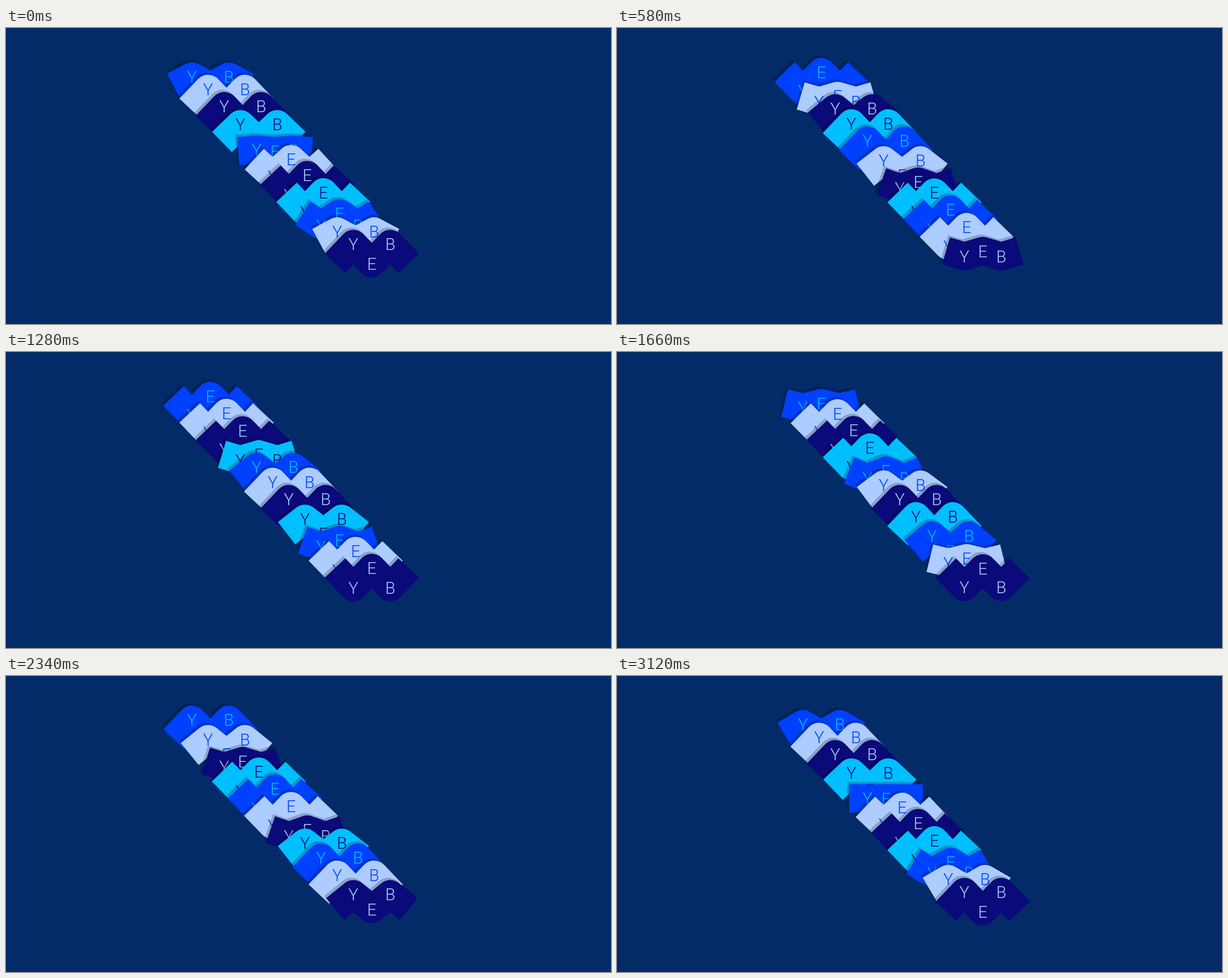
An HTML page with a canvas for the animation above (3140 ms loop, 1068 by 524 pixels).

```html
<!DOCTYPE html>
<html lang="en">
<head>
<meta charset="utf-8">
<title>Waving ribbons</title>
<style>
  html, body { margin: 0; width: 100%; height: 100%; overflow: hidden; background: #032b68; }
  canvas { display: block; width: 1068px; height: 524px; }
</style>
</head>
<body>
<canvas width="1068" height="524"></canvas>
<script>
const ctx = document.querySelector('canvas').getContext('2d');

const WORD = 'YEB';
const COUNT = 11;
const LOOP = 3140;      // ms
const LAG = 349;        // delay from one ribbon to the next
const RISE_AT = 154;    // when the first ribbon passes its rest pose
const SWING = 1040;     // duration of one swing, the rest is held
const AMPLITUDE = 17.2;
const PITCH = 32.5;     // distance between letters
const THICKNESS = 50;

const BLUE = '#0040ff', PALE = '#adccff', NAVY = '#0a0a7a', CYAN = '#00bfff';
const SCHEMES = [[BLUE, CYAN], [PALE, BLUE], [NAVY, PALE], [CYAN, NAVY]];

const mod = (a, n) => ((a % n) + n) % n;

// Quadratic ease in and out between -1 and 1, held at both extremes.
function lift(time) {
  const p = mod(time - RISE_AT, LOOP);
  const half = LOOP / 2;
  const fromRest = p < half / 2 ? p : p < half * 1.5 ? half - p : p - LOOP;
  const left = Math.max(0, 1 - 2 * Math.abs(fromRest) / SWING);
  return Math.sign(fromRest) * (1 - left * left);
}

function strokeRibbon(x, y, swing, color) {
  ctx.beginPath();
  for (let k = -2; k <= 2; k++) {
    ctx.lineTo(x + k * PITCH, y + (k % 2 ? swing : -swing));
  }
  ctx.strokeStyle = color;
  ctx.stroke();
}

function drawRibbon(i, time) {
  const x = 360.8 + 28.5 * i;
  const y = 94.5 + 30.5 * i;
  const swing = AMPLITUDE * lift(time - i * LAG);
  const [fill, ink] = SCHEMES[i % SCHEMES.length];

  strokeRibbon(x - 3.5, y - 4, swing, 'rgba(0, 0, 0, 0.21)');
  strokeRibbon(x, y, swing, fill);

  ctx.fillStyle = ink;
  [...WORD].forEach((letter, n) => {
    const k = n - 1;
    ctx.fillText(letter, x + k * PITCH, y + 11 + (k ? swing : -swing));
  });
}

function draw(now) {
  const time = now % LOOP;
  ctx.fillStyle = '#032b68';
  ctx.fillRect(0, 0, 1068, 524);
  ctx.lineWidth = THICKNESS;
  ctx.lineJoin = 'round';
  ctx.lineCap = 'butt';
  ctx.font = '300 29px Roboto, sans-serif';
  ctx.textAlign = 'center';
  for (let i = 0; i < COUNT; i++) drawRibbon(i, time);
}

const start = performance.now();
function tick() {
  draw(performance.now() - start);
  requestAnimationFrame(tick);
}
tick();
</script>
</body>
</html>
```
